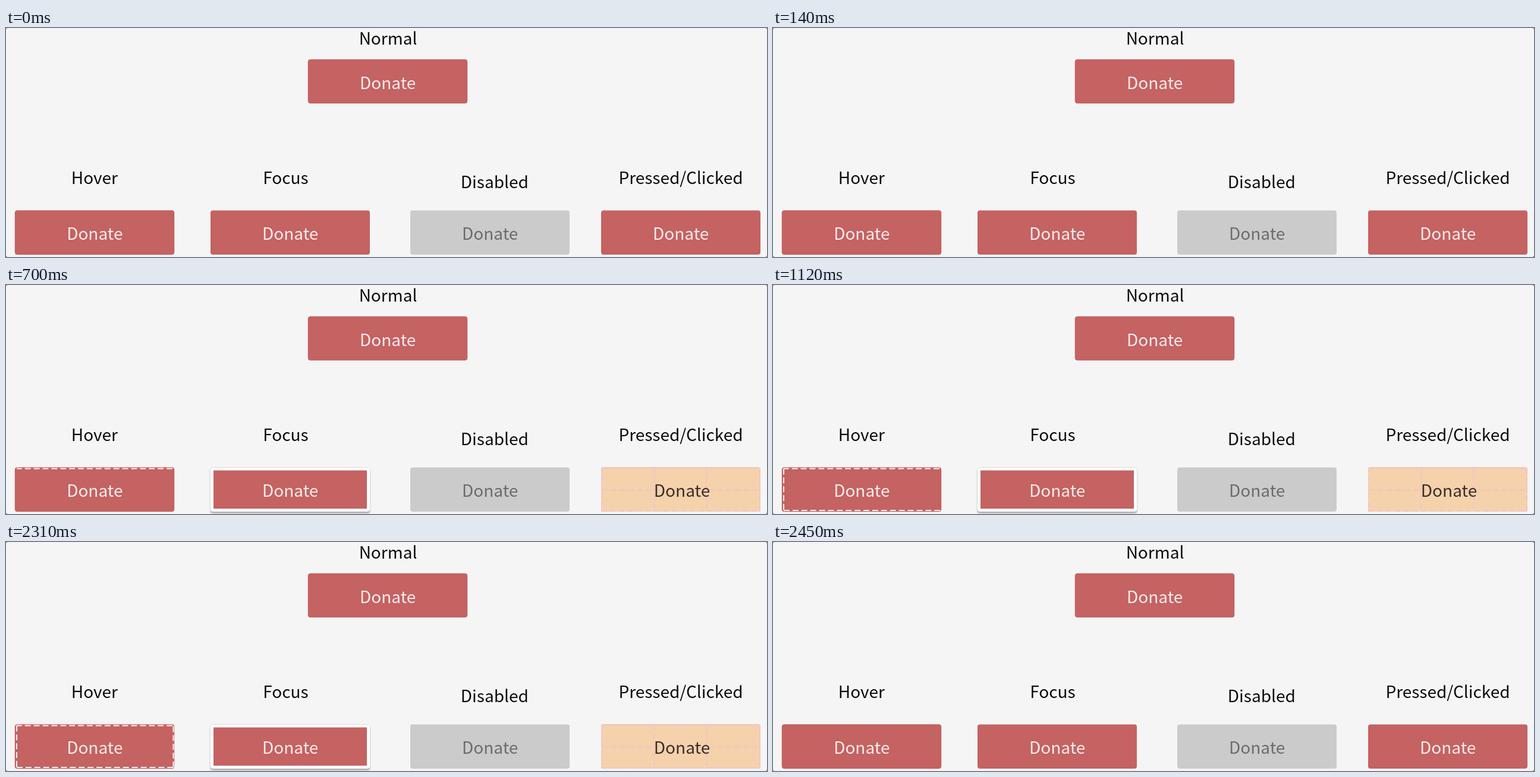
Animation of 1280 by 386 pixels, one loop 2.87 s. Source, as an HTML page:

```html
<!DOCTYPE html>
<html lang="en">
<head>
<meta charset="utf-8">
<title>Button states</title>
<style>
  html, body { margin: 0; width: 100%; height: 100%; overflow: hidden; background: #555; }
  svg { display: block; width: 100%; height: 100%; }
  text { font: 28px "Noto Sans CJK JP", "Noto Sans CJK SC", "Noto Sans CJK", "Noto Sans", sans-serif; text-anchor: middle; fill: #0c0c0c; }
  .light { fill: #f4ecec; }
  .red { fill: #c56262; }
  .button { stroke: #c56262; stroke-width: 1; stroke-opacity: .5; }
  .dash { stroke: #fbf1f1; stroke-width: 2; stroke-dasharray: 9.9 5; }
  #ring { fill: #fff; filter: drop-shadow(0 3px 1.5px rgba(0, 0, 0, .3)); }
  #grid { fill: none; stroke: #f1c3c6; stroke-width: 2; stroke-dasharray: 9.9 5; }
</style>
</head>
<body>
<svg viewBox="0 0 1280 386" preserveAspectRatio="none">
  <rect width="1280" height="386" rx="3" fill="#f5f5f5"/>

  <text x="642.5" y="28">Normal</text>
  <text x="148.8" y="263">Hover</text>
  <text x="470.5" y="263">Focus</text>
  <text x="821.8" y="270">Disabled</text>
  <text x="1135" y="263">Pressed/Clicked</text>

  <rect class="red button" x="508" y="53" width="268" height="74" rx="4"/>
  <text class="light" x="642.2" y="102.7">Donate</text>

  <rect class="red button" x="15" y="307.5" width="268" height="74.5" rx="4"/>
  <g id="edges"></g>
  <text class="light" x="149.3" y="357.3">Donate</text>

  <rect class="red" x="344" y="307.5" width="268" height="74.5" rx="4"/>
  <rect id="ring" x="344" y="307.5" width="268" height="74.5" rx="4"/>
  <rect class="red" x="349" y="312.5" width="258" height="64.5"/>
  <text class="light" x="478.2" y="357.3">Donate</text>

  <rect x="680" y="307.5" width="268" height="74.5" rx="4" fill="#cbcbcb"/>
  <text x="814.2" y="357.3" style="fill:#6c6c6c">Donate</text>

  <rect class="red" x="1001" y="307.5" width="268" height="74.5" rx="4"/>
  <text class="light" x="1135.2" y="357.3">Donate</text>
  <g id="pressed">
    <rect x="1001" y="307.5" width="268" height="74.5" rx="4" fill="#f5d2ab"/>
    <path id="grid" d="M1002 308.5H1268V381H1002ZM1002 345.5H1268M1090.5 308V381M1178.5 308V381"/>
  </g>
  <text id="darkText" x="1137" y="357.3" style="fill:#3a2e28">Donate</text>
</svg>
<script>
  const LOOP = 2870, STEP = 70, START = 575, RESET = 2450, GROW = 125, GAP = 210;
  const $ = id => document.getElementById(id);

  // Outline runs anticlockwise from the top right corner.
  const corners = [[280, 309.5], [18, 309.5], [18, 380], [281.5, 380], [281.5, 309.5]];
  const edges = corners.slice(1).map(() => {
    const line = document.createElementNS("http://www.w3.org/2000/svg", "line");
    line.setAttribute("class", "dash");
    return $("edges").appendChild(line);
  });

  function grown(t, delay) {
    if (t >= RESET) return 0;
    return Math.max(0, Math.min(1, (t - START - delay) / GROW));
  }

  function draw(now) {
    const t = Math.floor((now % LOOP) / STEP) * STEP;
    edges.forEach((line, i) => {
      const p = grown(t, i * GAP), [x1, y1] = corners[i], [x2, y2] = corners[i + 1];
      line.setAttribute("x1", x1);
      line.setAttribute("y1", y1);
      line.setAttribute("x2", x1 + (x2 - x1) * p);
      line.setAttribute("y2", y1 + (y2 - y1) * p);
      line.setAttribute("visibility", p ? "visible" : "hidden");
    });
    const fade = grown(t, 0);
    for (const id of ["ring", "pressed", "darkText"]) $(id).style.opacity = fade;
  }

  let begin;
  function tick(now) {
    begin ??= now;
    draw(now - begin);
    requestAnimationFrame(tick);
  }
  draw(0);
  requestAnimationFrame(tick);
</script>
</body>
</html>
```
